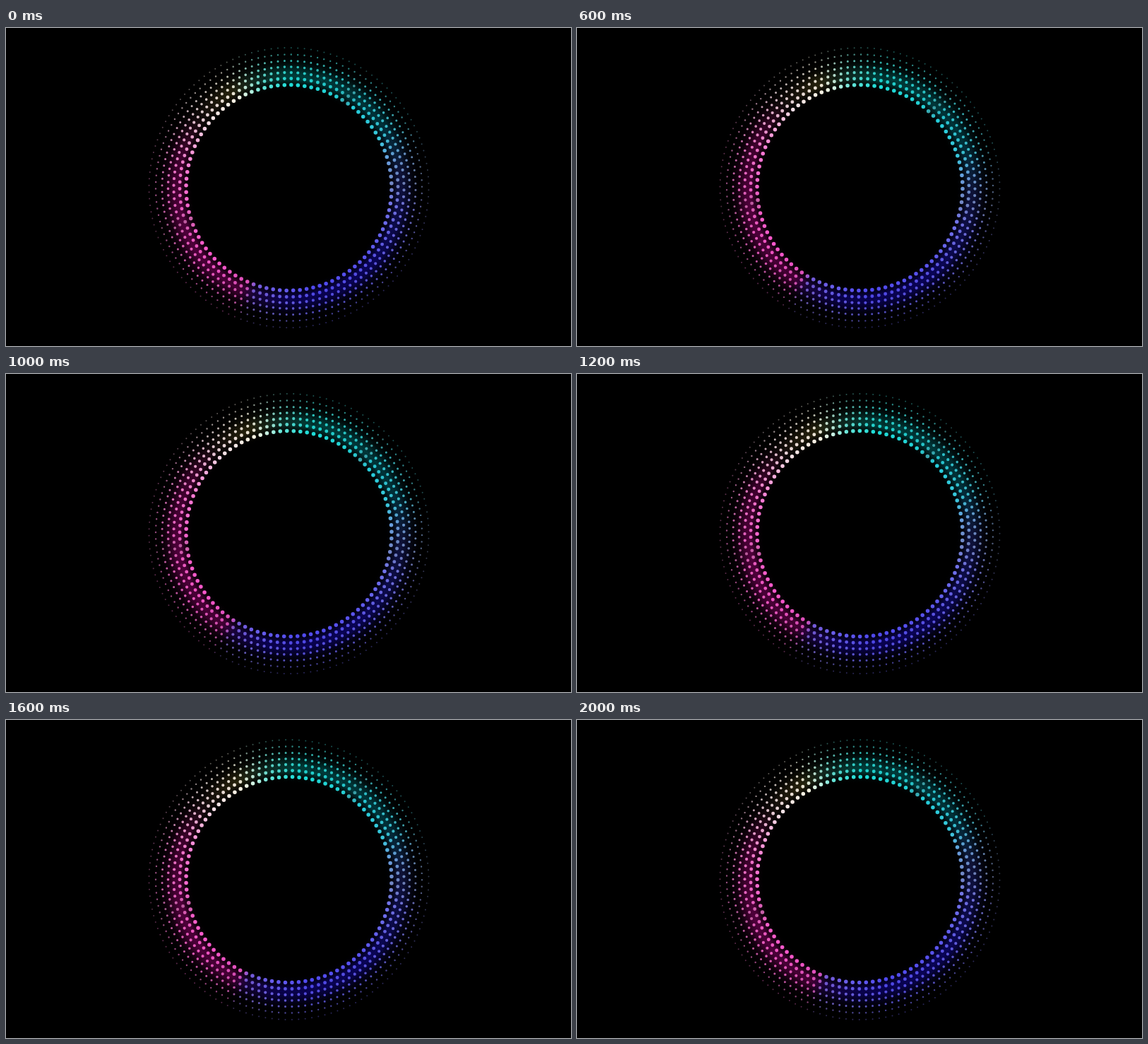
An HTML page with a canvas for the animation above (2200 ms loop, 800x450 px).

```html
<!DOCTYPE html>
<html lang="en">
<head>
<meta charset="utf-8">
<title>Dot ring</title>
<style>
  html, body { margin: 0; width: 100%; height: 100%; overflow: hidden; background: #000; }
  canvas { display: block; }
</style>
</head>
<body>
<canvas width="800" height="450"></canvas>
<script>
const ctx = document.querySelector('canvas').getContext('2d');
const LOOP = 2200, STEP = 200, TAU = Math.PI * 2;
const CX = 400.5, CY = 226;

// Ring radius, dot radius, opacity, whitening
const RINGS = [
  [145.5, 2.75, 1, .1],
  [154.5, 2.45, .92, .12],
  [163, 2.1, .88, .16],
  [171, 1.8, .82, .2],
  [179.5, 1.5, .72, .26],
  [188.5, 1.2, .52, .32],
  [198, 1, .3, .32]
];

// Degrees clockwise from the top
const DOT_STOPS = [
  [0, '#08dcd8'], [28, '#10ccd4'], [33, '#2a9ca8'], [38, '#10ccdc'],
  [62, '#26c4dc'], [74, '#5c96e0'], [88, '#667cc4'], [100, '#6666ee'],
  [130, '#4c44f0'], [165, '#4038f4'], [185, '#5a4ef0'], [199, '#6a4cd8'],
  [203, '#dc40b8'], [225, '#ff48cc'], [246, '#f850c8'], [252, '#c050a0'],
  [258, '#f854cc'], [280, '#ff6cd4'], [297, '#f8a8dc'], [310, '#f8e0e8'],
  [330, '#fcf6e4'], [337, '#c4f4e4'], [345, '#58e4d8'], [360, '#08dcd8']
];
const GLOW_STOPS = [
  [0, '#008078'], [55, '#006878'], [82, '#202878'], [130, '#1408b8'],
  [180, '#1404a8'], [198, '#300878'], [206, '#90006c'], [250, '#a8007c'],
  [288, '#80005c'], [308, '#281818'], [328, '#504818'], [342, '#205040'], [360, '#008078']
];

// Colour drift in degrees, one value per step
const DRIFT = [0, 4, 8, 10, 12, 11, 8, 6, 4, 2, 0];

function wheel(stops, drift) {
  const gradient = ctx.createConicGradient((drift - 90) * TAU / 360, CX, CY);
  for (const [angle, color] of stops) gradient.addColorStop(angle / 360, color);
  return gradient;
}

function drawGlow(drift) {
  ctx.strokeStyle = wheel(GLOW_STOPS, drift);
  ctx.lineWidth = 1.5;
  for (let r = 138; r < 198; r++) {
    const spread = r < 157 ? 9 : 15;
    ctx.globalAlpha = .36 * Math.exp(-(((r - 157) / spread) ** 2));
    ctx.beginPath();
    ctx.arc(CX, CY, r, 0, TAU);
    ctx.stroke();
  }
}

function drawDots(progress, drift) {
  const colors = wheel(DOT_STOPS, drift);
  RINGS.forEach(([radius, size, opacity, white], i) => {
    const count = 96 + 6 * i;
    ctx.beginPath();
    for (let n = 0; n < count; n++) {
      const angle = (n + progress * 3 + .35) / count * TAU + Math.PI / 2;
      const x = CX + radius * Math.cos(angle), y = CY + radius * Math.sin(angle);
      ctx.moveTo(x + size, y);
      ctx.arc(x, y, size, 0, TAU);
    }
    ctx.globalAlpha = opacity;
    ctx.fillStyle = colors;
    ctx.fill();
    ctx.globalAlpha = opacity * white;
    ctx.fillStyle = '#d8dcc8';
    ctx.fill();
  });
}

function draw(time) {
  const step = Math.floor(time % LOOP / STEP);
  ctx.globalAlpha = 1;
  ctx.fillStyle = '#000';
  ctx.fillRect(0, 0, 800, 450);
  drawGlow(DRIFT[step]);
  drawDots(step * STEP / LOOP, DRIFT[step]);
}

const start = performance.now();
function tick() {
  draw(performance.now() - start);
  requestAnimationFrame(tick);
}
tick();
</script>
</body>
</html>
```
